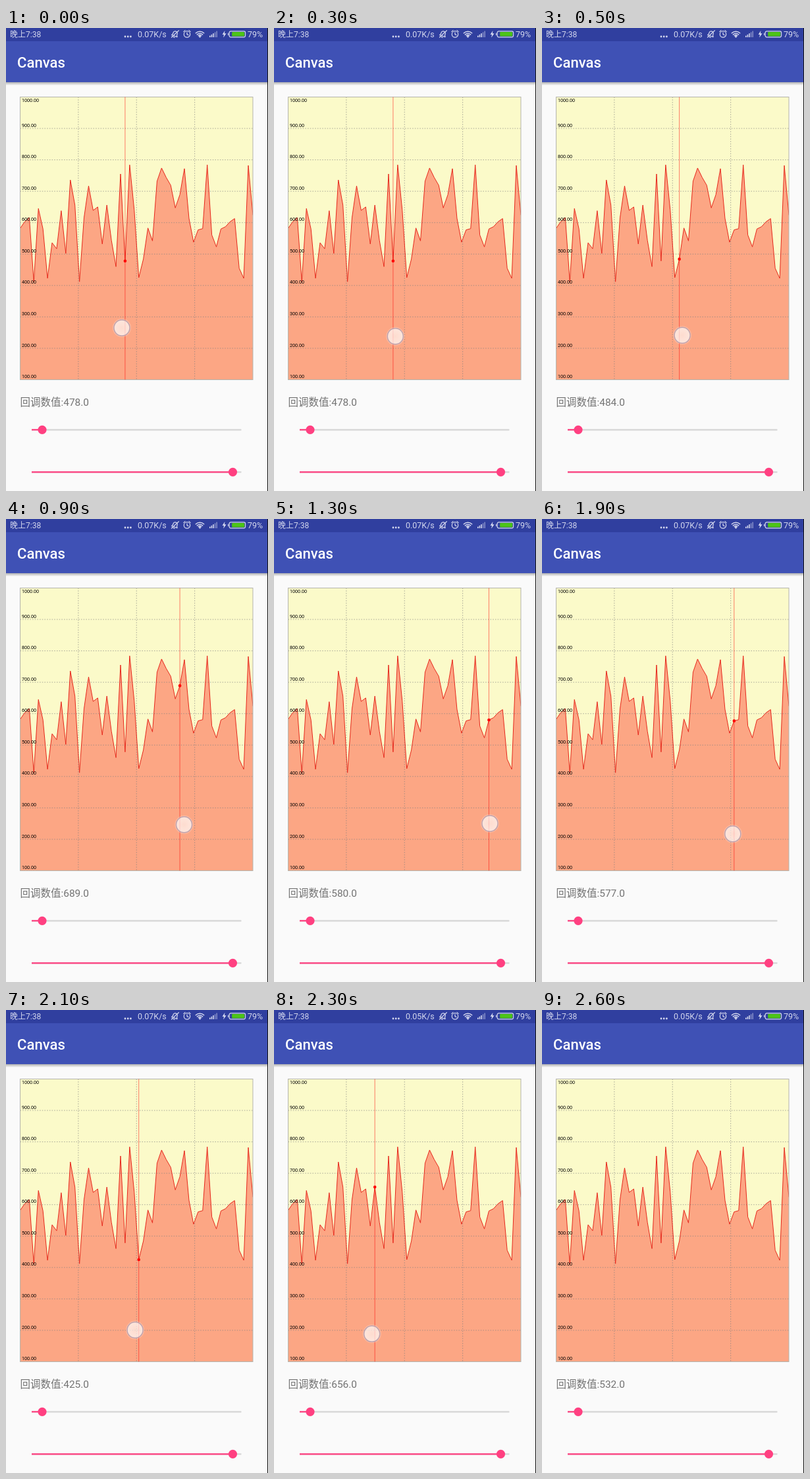
An HTML page for the animation above (2.9 s loop, 398 by 701 pixels).

```html
<!DOCTYPE html>
<html lang="zh">
<head>
<meta charset="utf-8">
<title>Canvas</title>
<style>
html, body { margin: 0; width: 100%; height: 100%; overflow: hidden; background: #fafafa; }
svg { display: block; width: 398px; height: 701px; font-family: Roboto, "Noto Sans CJK SC", "Noto Sans CJK", sans-serif; }
</style>
</head>
<body>
<svg viewBox="0 0 398 701" xmlns="http://www.w3.org/2000/svg">
  <defs>
    <linearGradient id="shade" x1="0" y1="0" x2="0" y2="1">
      <stop offset="0" stop-color="#000" stop-opacity=".3"/>
      <stop offset="1" stop-color="#000" stop-opacity="0"/>
    </linearGradient>
    <radialGradient id="glass">
      <stop offset="0" stop-color="#fff" stop-opacity=".5"/>
      <stop offset="1" stop-color="#fff" stop-opacity=".64"/>
    </radialGradient>
    <clipPath id="plot"><rect x="21.5" y="104" width="353.5" height="429"/></clipPath>
  </defs>

  <rect width="398" height="701" fill="#fafafa"/>
  <rect y="82" width="398" height="5" fill="url(#shade)"/>
  <rect width="398" height="82" fill="#3f51b5"/>
  <rect width="398" height="20" fill="#303f9f"/>
  <text x="17" y="60" font-size="22.1" font-weight="500" fill="#fff">Canvas</text>

  <g fill="#d3d7ee" font-size="12.5">
    <text x="6" y="14" font-size="12">晚上7:38</text>
    <g id="more"></g>
    <text id="speed" x="200" y="14">0.07K/s</text>
    <text x="367" y="14">79%</text>
    <path d="M332.4 4L328.6 10H331L330.2 14.5L334.6 8.2H332Z"/>
    <g id="signal"></g>
    <circle cx="294.5" cy="13" r="1.5"/>
  </g>
  <g fill="none" stroke="#d3d7ee" stroke-width="1.2" stroke-linecap="round" stroke-linejoin="round">
    <g transform="rotate(20 257 9)">
      <path d="M252.5 12.3H261.5L260 10V7.5A3.3 3.3 0 0 0 253.6 7.5V10ZM255.7 14.3H258"/>
    </g>
    <path d="M251.5 14L262.5 3.8"/>
    <circle cx="275" cy="9.4" r="4.7"/>
    <path d="M275 6.8V9.6L277 10.6M269.8 5.6L272 3.6M280.2 5.6L278 3.6"/>
    <path d="M288.3 7.8A8.8 8.8 0 0 1 300.7 7.8M290.4 9.9A5.8 5.8 0 0 1 298.6 9.9M292.3 11.7A3.2 3.2 0 0 1 296.7 11.7" stroke-width="1.5"/>
    <rect x="339.2" y="4.8" width="24.4" height="9" rx="2.2"/>
    <path d="M337.6 8V10.6"/>
  </g>
  <rect x="343.2" y="6.1" width="19" height="6.4" rx="1" fill="#4cc417"/>

  <rect x="21.5" y="104.5" width="353.5" height="428" fill="#fbfac9"/>
  <g clip-path="url(#plot)">
    <path id="area" fill="#fca684"/>
    <path id="grid" fill="none" stroke="#808080" stroke-width=".8" stroke-opacity=".85" stroke-dasharray="1.5 2.2"/>
    <path id="curve" fill="none" stroke="#e6281c" stroke-width="1"/>
  </g>
  <rect x="21.5" y="104.5" width="353.5" height="428" fill="none" stroke="#b4b4ac"/>
  <g id="labels" font-size="7.2" fill="#000"></g>
  <g id="cursor">
    <path id="rule" stroke="#f00" stroke-opacity=".5" stroke-width="1"/>
    <circle id="dot" r="2.3" fill="#f00"/>
  </g>
  <g id="touch">
    <circle r="14" fill="#fff" fill-opacity=".22"/>
    <circle r="12" fill="url(#glass)" stroke="#b59cac" stroke-opacity=".85" stroke-width="1.5"/>
  </g>

  <text id="value" x="21.6" y="572" font-size="15.47" fill="#737373"></text>
  <g id="sliders"></g>
  <rect x="397" width="1" height="701" fill="#111"/>
</svg>
<script>
const $ = id => document.getElementById(id);
const set = (el, attrs) => { for (const k in attrs) el.setAttribute(k, attrs[k]); };
const LEFT = 21.5, TOP = 104.5, BOTTOM = 532.5, WIDTH = 353.5;
const LOOP = 2900, TICK = 100;

// The plotted series
const values = [
  582, 603, 616, 412, 645, 580, 423, 536, 517, 638, 502, 736, 656,
  412, 616, 717, 639, 650, 532, 656, 544, 460, 755, 478, 784, 641,
  425, 484, 583, 542, 732, 774, 744, 719, 647, 689, 772, 614, 538,
  577, 581, 784, 561, 523, 580, 587, 603, 613, 455, 423, 782, 624
];
const step = WIDTH / (values.length - 1);
const px = i => LEFT + i * step;
const py = v => TOP + (1000 - v) * (BOTTOM - TOP) / 900;
const mix = (a, b, u) => a + (b - a) * u;

// Steady speed with soft start and stop, each lasting the share r
function ease(u, r) {
  if (u > 0.5) return 1 - ease(1 - u, r);
  return (u < r ? u * u / (2 * r) : u - r / 2) / (1 - r);
}

// Finger strokes between turning points; soft is the share for ease()
const stops = [
  { t: 0, x: 176, y: 454, soft: 0.5 },
  { t: 150, x: 171.5, y: 468, soft: 0.085 },
  { t: 1580, x: 359.5, y: 460, soft: 0.5 },
  { t: 2374, x: 145, y: 492 }
];

function finger(t) {
  const n = Math.min(stops.filter(s => s.t <= t).length, stops.length - 1);
  const a = stops[n - 1], b = stops[n];
  const u = Math.min((t - a.t) / (b.t - a.t), 1);
  return {
    x: mix(a.x, b.x, ease(u, a.soft)),
    y: mix(a.y, b.y, u * (3 - u) / 2),
    right: b.x > a.x
  };
}

function build() {
  const line = values.map((v, i) => `${px(i).toFixed(2)} ${py(v).toFixed(2)}`).join("L");
  set($("curve"), { d: "M" + line });
  set($("area"), { d: `M${LEFT} ${BOTTOM}L${line}V${BOTTOM}Z` });

  let grid = "", labels = "";
  for (let v = 1000; v >= 100; v -= 100) {
    const y = py(v);
    if (v < 1000 && v > 100) grid += `M${LEFT} ${y}H${LEFT + WIDTH}`;
    labels += `<text x="24" y="${Math.max(y - 2.4, TOP + 7.7)}">${v.toFixed(2)}</text>`;
  }
  for (let i = 1; i < 4; i++) grid += `M${LEFT + i * WIDTH / 4} ${TOP}V${BOTTOM}`;
  set($("grid"), { d: grid });
  $("labels").innerHTML = labels;

  let dots = "", bars = "";
  for (let i = 0; i < 3; i++) dots += `<circle cx="${181 + i * 4.2}" cy="13" r="1.4"/>`;
  for (let i = 0; i < 5; i++) {
    const h = 2.4 + i * 1.75;
    bars += `<rect x="${309 + i * 2.6}" y="${14 - h}" width="1.6" height="${h}" opacity="${i < 3 ? 1 : 0.5}"/>`;
  }
  $("more").innerHTML = dots;
  $("signal").innerHTML = bars;

  $("sliders").innerHTML = [[55, 608.3], [344.5, 672.3]].map(([x, y]) =>
    `<path d="M39 ${y}H357.5" stroke="#d6d6d6" stroke-width="2.2"/>
     <path d="M39 ${y}H${x}" stroke="#ff4081" stroke-width="2.2"/>
     <circle cx="${x}" cy="${y}" r="6.6" fill="#ff4081"/>`).join("");
}

function draw(time) {
  const t = Math.floor((time % LOOP) / TICK) * TICK;
  const { x, y, right } = finger(t);
  // The cursor snaps to the last point the finger passed
  const pos = (x - LEFT) / step;
  const i = right ? Math.floor(pos) : Math.ceil(pos);

  set($("cursor"), { visibility: t < 2400 ? "visible" : "hidden" });
  set($("rule"), { d: `M${px(i)} ${TOP}V${BOTTOM}` });
  set($("dot"), { cx: px(i), cy: py(values[i]) });
  set($("touch"), {
    transform: `translate(${x} ${y})`,
    opacity: t < 2500 ? 1 : t < 2600 ? 0.5 : 0
  });
  $("value").textContent = "回调数值:" + values[i].toFixed(1);
  $("speed").textContent = t < 2300 ? "0.07K/s" : "0.05K/s";
}

build();
const start = performance.now();
function tick() {
  draw(performance.now() - start);
  requestAnimationFrame(tick);
}
tick();
</script>
</body>
</html>
```
